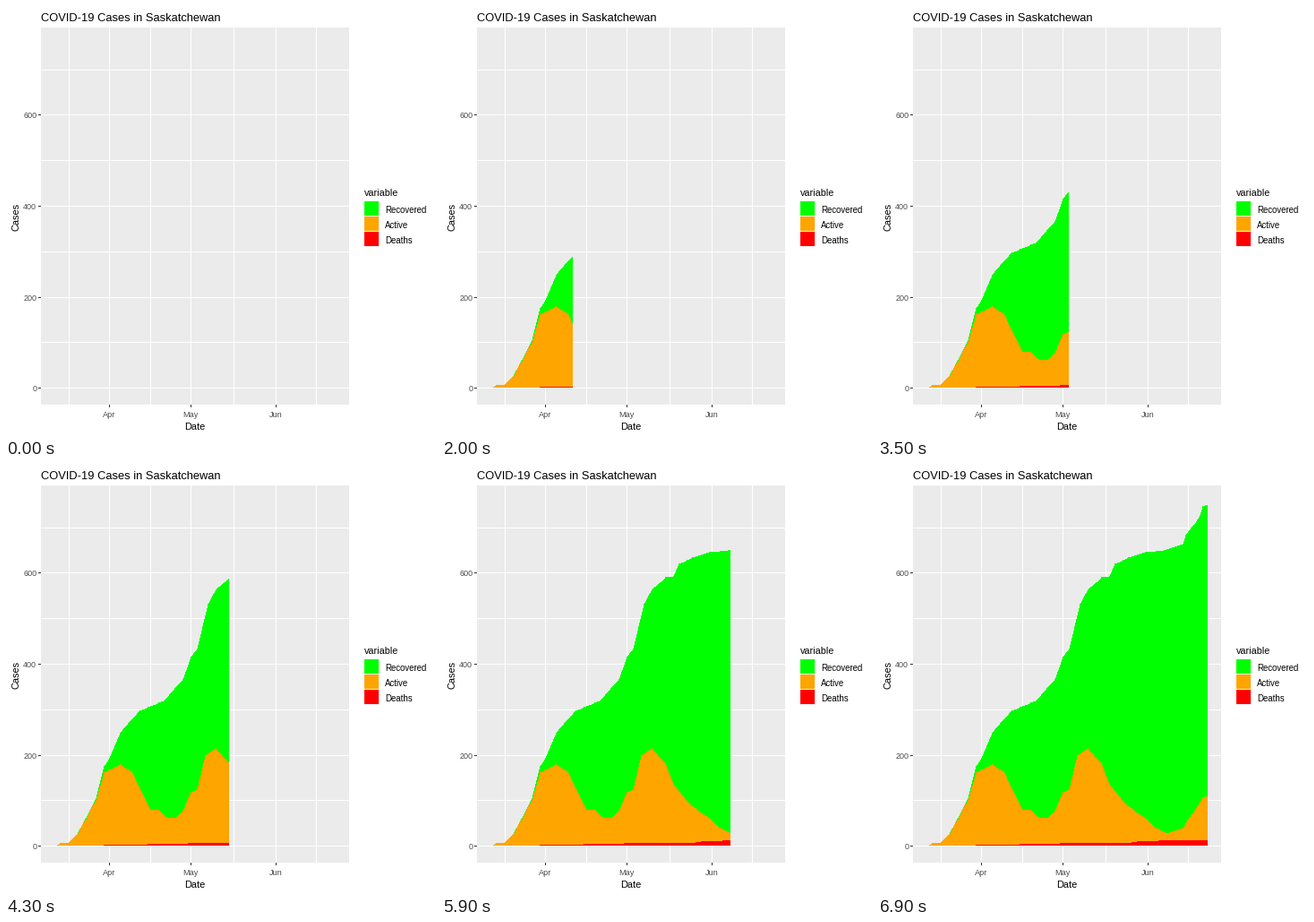
A matplotlib script that plays this animation: 480 px wide and 480 px high, repeating every 10 s.

```python
import math

import numpy as np
import matplotlib.pyplot as plt
from matplotlib.animation import FuncAnimation
from matplotlib.patches import Polygon, Rectangle

SIZE, DPI = 480, 100
FRAMES, INTERVAL, LAST_STEP = 100, 100, 69
DAYS = 103

# Key points (days since 12 March, stacked top); straight lines between them
RISE = [(0, 1), (2, 6), (5, 8), (8, 26)]
TOTAL = RISE + [
    (15, 104), (18, 176), (20, 193), (24, 249), (31, 298), (40, 320), (47, 366),
    (50, 415), (52, 433), (56, 531), (59, 564), (64, 590), (67, 592), (69, 620),
    (74, 634), (80, 646), (88, 651), (94, 664), (95, 683), (100, 726), (101, 746),
    (103, 751),
]
ACTIVE = RISE + [
    (15, 101), (18, 161), (24, 180), (28, 163), (35, 80), (38, 79), (41, 63),
    (44, 61), (47, 78), (50, 118), (52, 124), (55, 200), (59, 215), (64, 181),
    (67, 136), (73, 92), (80, 61), (83, 44), (88, 28), (94, 40), (101, 107),
    (103, 109),
]
DEATHS = [(0, 0), (17, 0), (18, 2), (49, 6), (74, 7), (78, 11), (91, 13), (103, 13)]


def px(d):
    return np.floor(54.3 + 3.043 * np.asarray(d) + 0.5)


def py(v):
    return np.floor(426.2 - 0.508 * np.asarray(v) + 0.5)


def column_tops(points):
    """Top pixel row of the area in every pixel column."""
    day = np.arange(DAYS + 1)
    values = np.floor(np.interp(day, *zip(*points)))
    cols = np.arange(px(0), px(DAYS))
    return np.ceil(np.interp(cols, px(day), py(values)))


fig = plt.figure(figsize=(SIZE / DPI, SIZE / DPI), dpi=DPI, facecolor="white")
ax = fig.add_axes([0, 0, 1, 1])
ax.set_xlim(0, SIZE)
ax.set_ylim(SIZE, 0)
ax.axis("off")


def box(x, y, w, h, color):
    ax.add_patch(Rectangle((x, y), w, h, fc=color, lw=0, aa=False, zorder=1))


def label(x, y, text, size, color="black", ha="left", **kw):
    ax.text(x, y, text, fontsize=size * 72 / DPI, color=color, ha=ha,
            va="baseline", family="Liberation Sans", **kw)


# Panel, grid and axes
box(39, 24, 344, 421, "#EBEBEB")
for v in range(0, 701, 100):
    box(39, py(v), 344, 1, "white")
for d in (5, 20, 35, 50, 65.5, 81, 96):
    box(px(d), 24, 1, 421, "white")
for v in range(0, 601, 200):
    box(36, py(v), 3, 1, "#333333")
    label(34.3, py(v) + 4, str(v), 9, "#4D4D4D", "right")
for d, name in ((20, "Apr"), (50, "May"), (81, "Jun")):
    box(px(d), 445, 1, 3, "#333333")
    label(px(d), 459, name, 9.2, "#4D4D4D", "center")
label(39, 17, "COVID-19 Cases in Saskatchewan", 12.95)
label(210.5, 473, "Date", 11, ha="center")
label(15, 235.3, "Cases", 11, ha="center", rotation=90, rotation_mode="anchor")

# Legend and areas
label(400, 212, "variable", 10.7)
box(400, 218, 17, 51, "#F2F2F2")
LAYERS = (("Recovered", "#00FF00", TOTAL), ("Active", "#FFA500", ACTIVE),
          ("Deaths", "#FF0000", DEATHS))
areas = []
for i, (name, color, points) in enumerate(LAYERS):
    box(400, 218 + 17 * i, 16, 16, color)
    label(423, 231 + 17 * i, name, 9.6)
    area = Polygon([(0, 0), (0, 0), (0, 0)], fc=color, lw=0, aa=False,
                   snap=False, zorder=2 + i)
    ax.add_patch(area)
    areas.append((area, column_tops(points)))


def update(frame):
    step = min(frame, LAST_STEP)
    last = min(DAYS, math.floor((step + 0.5) * DAYS / LAST_STEP))
    left, right = px(0), px(last)
    width = int(right - left)
    # Each column contributes a flat top one pixel wide
    xs = np.repeat(np.arange(left, right + 1), 2)[1:-1]
    for area, tops in areas:
        area.set_visible(last > 0)
        if last > 0:
            top = np.column_stack([xs, np.repeat(tops[:width], 2)])
            area.set_xy(np.vstack([top, (right, py(0)), (left, py(0))]))
    return [area for area, _ in areas]


anim = FuncAnimation(fig, update, frames=FRAMES, interval=INTERVAL,
                     init_func=lambda: update(0), repeat=True, repeat_delay=0)
plt.show()
```
